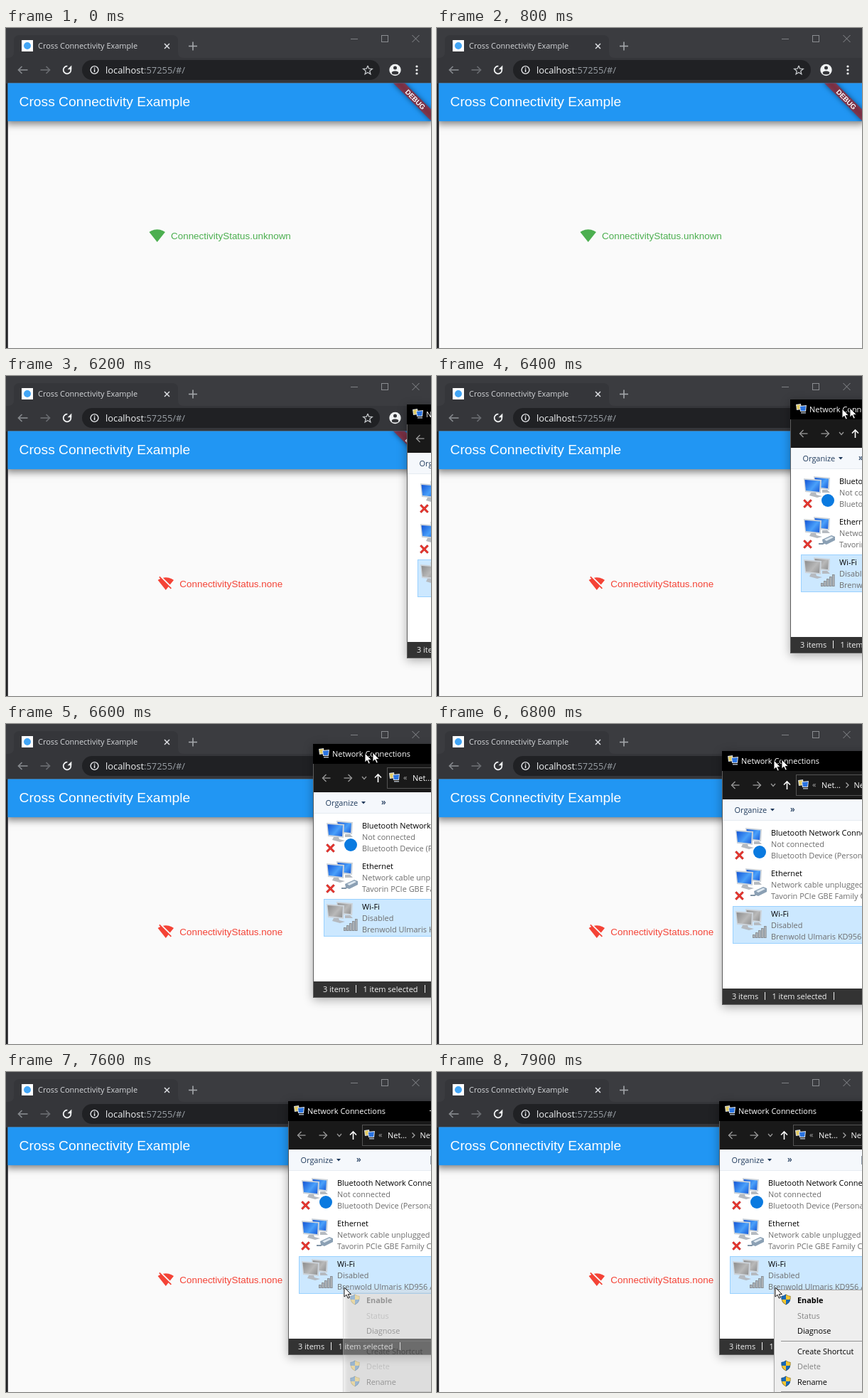
An HTML page with a canvas for the animation above (8000 ms loop, 598 px wide and 450 px high).

```html
<!DOCTYPE html>
<html lang="en">
<head>
<meta charset="utf-8">
<title>Connectivity demo</title>
<style>
html, body { margin: 0; width: 100%; height: 100%; overflow: hidden; background: #fafafa; }
canvas { display: block; width: 598px; height: 450px; }
</style>
</head>
<body>
<canvas id="stage" width="598" height="450"></canvas>
<script>
const c = document.getElementById('stage').getContext('2d');
const LOOP = 8000, STEP = 100, TAU = Math.PI * 2;
const UI = '"Open Sans", "Noto Sans", sans-serif';
const APP = '"Liberation Sans", Arial, sans-serif';

const WIFI_ON = new Path2D('M12.01 21.49L23.64 7c-.45-.34-4.93-4-11.64-4C5.28 3 .81 6.66.36 7l11.63 14.49.01.01z');
const WIFI_OFF = new Path2D('M23.64 7c-.45-.34-4.93-4-11.64-4-1.5 0-2.89.19-4.15.48L18.18 13.8 23.64 7z' +
  'm-6.6 8.22L3.27 1.44 2 2.72l2.05 2.06C1.91 5.76.59 6.82.36 7l11.63 14.49.01.01.01-.01 3.9-4.86 3.32 3.32 1.27-1.27z');
const POINTER = new Path2D('M0 0V14.6L3.4 11.4 5.8 16.8 8.2 15.7 5.8 10.5H10.4Z');

const WINDOW_PATH = [[6200, 565, 40], [6400, 498, 33], [6600, 433, 28], [6700, 415, 31], [6800, 402, 38], [6900, 398, 41]];
const POINTER_PATH = [[6900, 471, 55], [7000, 471, 58], [7100, 470, 190], [7200, 469, 278],
  [7300, 473, 290], [7400, 475, 299], [7500, 476, 303]];

const clamp = v => Math.max(0, Math.min(1, v));

function along(keys, t) {
  let i = 0;
  while (i < keys.length - 2 && t > keys[i + 1][0]) i++;
  const [t0, x0, y0] = keys[i], [t1, x1, y1] = keys[i + 1];
  const k = clamp((t - t0) / (t1 - t0));
  return [x0 + (x1 - x0) * k, y0 + (y1 - y0) * k];
}

function rect(x, y, w, h, fill) {
  c.fillStyle = fill;
  c.fillRect(x, y, w, h);
}

function frame(x, y, w, h, color) {
  c.strokeStyle = color;
  c.lineWidth = 1;
  c.strokeRect(x + .5, y + .5, w - 1, h - 1);
}

function line(points, color, width = 1) {
  c.beginPath();
  points.forEach(([x, y]) => c.lineTo(x, y));
  c.strokeStyle = color;
  c.lineWidth = width;
  c.stroke();
}

function poly(points, fill) {
  c.beginPath();
  points.forEach(([x, y]) => c.lineTo(x, y));
  c.closePath();
  c.fillStyle = fill;
  c.fill();
}

function disc(x, y, r, fill) {
  c.beginPath();
  c.arc(x, y, r, 0, TAU);
  c.fillStyle = fill;
  c.fill();
}

function cross(x, y, r, color, width) {
  line([[x - r, y - r], [x + r, y + r]], color, width);
  line([[x + r, y - r], [x - r, y + r]], color, width);
}

function text(s, x, y, color, size = 10.95, family = UI, weight = 400) {
  c.font = `${weight} ${size}px ${family}`;
  c.fillStyle = color;
  c.fillText(s, x, y);
}

function at(x, y, draw, scale = 1) {
  c.save();
  c.translate(x, y);
  c.scale(scale, scale);
  draw();
  c.restore();
}

// dir 1 points right, -1 points left
function arrow(x, y, r, dir, color, width) {
  line([[x - r * dir, y], [x + r * dir, y]], color, width);
  line([[x + dir * (r - 5), y - 5], [x + r * dir, y], [x + dir * (r - 5), y + 5]], color, width);
}

function browser() {
  rect(0, 0, 598, 78, '#3b3c40');
  rect(0, 42, 598, 36, '#35363a');
  c.beginPath();
  c.moveTo(3, 42);
  c.quadraticCurveTo(11, 42, 11, 34);
  c.lineTo(11, 18);
  c.quadraticCurveTo(11, 10, 19, 10);
  c.lineTo(234, 10);
  c.quadraticCurveTo(242, 10, 242, 18);
  c.lineTo(242, 34);
  c.quadraticCurveTo(242, 42, 250, 42);
  c.fillStyle = '#35363a';
  c.fill();

  rect(22, 17, 16, 16, '#fff');
  disc(30, 25, 5, '#42a5f5');
  text('Cross Connectivity Example', 45, 29, '#d5d7da');
  cross(226.5, 25.5, 3.5, '#dfe1e5', 1.5);
  line([[257, 25.5], [269, 25.5]], '#a4a7ab', 1.6);
  line([[263, 19.5], [263, 31.5]], '#a4a7ab', 1.6);

  line([[485, 15.5], [495, 15.5]], '#7e8084');
  frame(528, 10, 10, 10, '#8a8c90');
  cross(576.5, 15, 5, '#8a8c90', 1);

  arrow(24, 59, 6.5, -1, '#85888c', 1.7);
  arrow(55, 59, 6.5, 1, '#696c70', 1.7);
  c.beginPath();
  c.arc(86, 59, 5.3, -.7, TAU - 1.5, false);
  c.strokeStyle = '#f1f3f4';
  c.lineWidth = 1.8;
  c.stroke();
  poly([[92.3, 52.5], [92.3, 58.2], [86.6, 58.2]], '#f1f3f4');

  c.beginPath();
  c.roundRect(107, 45, 419, 28, 14);
  c.fillStyle = '#202124';
  c.fill();
  c.beginPath();
  c.arc(124.5, 59, 5.4, 0, TAU);
  c.strokeStyle = '#e8eaed';
  c.lineWidth = 1.4;
  c.stroke();
  rect(123.8, 58, 1.5, 4, '#e8eaed');
  rect(123.8, 55.7, 1.5, 1.5, '#e8eaed');
  text('localhost', 140, 63.7, '#f1f3f4', 12.9);
  text(':57255/#/', 140 + c.measureText('localhost').width, 63.7, '#9aa0a6', 12.9);

  const star = Array.from({ length: 11 }, (_, i) => {
    const r = i % 2 ? 2.9 : 6.6, a = i * Math.PI / 5 - Math.PI / 2;
    return [509 + r * Math.cos(a), 59.5 + r * Math.sin(a)];
  });
  line(star, '#c4c7ca', 1.3);

  disc(547.5, 59, 8.2, '#f1f3f4');
  disc(547.5, 56, 2.5, '#35363a');
  c.beginPath();
  c.ellipse(547.5, 63, 4.8, 2.5, 0, 0, TAU);
  c.fill();
  for (const y of [54, 59, 64]) disc(578, y, 1.6, '#f1f3f4');
}

function banner() {
  c.save();
  c.translate(599, 77.3);
  c.rotate(Math.PI / 4);
  c.scale(.96, .96);
  c.filter = 'blur(3.6px)';
  rect(-40, 28, 80, 12, 'rgba(0,0,0,.5)');
  c.filter = 'none';
  rect(-40, 28, 80, 12, 'rgba(183,28,28,.627)');
  c.textAlign = 'center';
  text('DEBUG', 0, 37.7, '#fff', 10.2, APP, 700);
  c.restore();
}

function page(online) {
  const left = 2.5, top = 77.4;
  rect(0, 78, 3, 372, '#202124');
  c.save();
  c.beginPath();
  c.rect(left, top, 598, 373);
  c.clip();
  rect(left, top, 598, 373, '#fafafa');
  c.shadowColor = 'rgba(0,0,0,.5)';
  c.shadowBlur = 10;
  c.shadowOffsetY = 4;
  rect(0, 70, 600, 61.1, '#2196f3');
  c.shadowColor = 'transparent';
  text('Cross Connectivity Example', 18.5, 110.4, '#fff', 19.25, APP);
  banner();
  c.restore();

  const color = online ? '#4caf50' : '#f44336';
  c.fillStyle = color;
  at(online ? 201.2 : 213.3, 280.3, () => c.fill(online ? WIFI_ON : WIFI_OFF), .96);
  text('ConnectivityStatus.' + (online ? 'unknown' : 'none'), online ? 232 : 244.3, 296.6, color, 13.44, APP);
}

function monitor(x, y, w, h, [light, dark]) {
  poly([[x, y], [x + w, y + 2], [x + w - 1, y + h], [x + 2, y + h - 2]], '#ccd3da');
  const g = c.createLinearGradient(x, y, x + w, y + h);
  g.addColorStop(0, dark);
  g.addColorStop(.55, light);
  g.addColorStop(1, dark);
  poly([[x + 1.5, y + 2], [x + w - 2, y + 3.5], [x + w - 3, y + h - 2], [x + 3, y + h - 4]], g);
}

function computers(x, y, off) {
  const tone = off ? ['#b9b9b9', '#848484'] : ['#4aa0fa', '#0a48cf'];
  monitor(x + 15, y, 23, 19, tone);
  poly([[x + 27, y + 19], [x + 34, y + 19], [x + 38, y + 23], [x + 27, y + 23]], '#b5bac0');
  monitor(x + 1, y + 3, 25, 21, tone);
  poly([[x + 11, y + 23], [x + 18, y + 23], [x + 19, y + 26], [x + 27, y + 28], [x + 20, y + 30], [x + 9, y + 27]], '#b5bac0');
}

function smallComputers(x, y) {
  poly([[x, y + 1], [x + 7, y], [x + 8, y + 8], [x + 1, y + 9]], '#d9dde2');
  poly([[x + 1, y + 2], [x + 6, y + 1.2], [x + 7, y + 7], [x + 2, y + 8]], '#e3cc62');
  poly([[x + 5, y + 3], [x + 15, y + 2], [x + 14, y + 11], [x + 6, y + 11]], '#d9dde2');
  poly([[x + 6, y + 4], [x + 14, y + 3.2], [x + 13, y + 10], [x + 7, y + 10]], '#2a74e2');
  rect(x + 7, y + 12, 7, 1.5, '#aeb5bd');
}

function badCross(x, y) {
  cross(x, y, 5.2, '#b52020', 3);
  cross(x, y, 5, '#e8372f', 2);
}

function plug(x, y) {
  line([[x - 1, y + 14], [x + 5, y + 14], [x + 10, y + 9]], '#8194a6', 2);
  poly([[x + 4, y + 8], [x + 17, y + 2], [x + 22, y + 4], [x + 22, y + 9], [x + 10, y + 15], [x + 5, y + 13]], '#8ba0b4');
  poly([[x + 7, y + 8], [x + 17, y + 3.5], [x + 20, y + 5], [x + 10, y + 10]], '#dfe9f1');
}

function bars(x, y) {
  for (let i = 0; i < 5; i++) {
    const h = 5 + i * 3;
    rect(x + i * 4, y + 17 - h, 3.6, h, '#8a8f94');
    rect(x + i * 4 + 1, y + 18 - h, 1.4, h - 2, '#b9bdc1');
  }
}

const ROWS = [
  ['Bluetooth Network Connection', 'Not connected', 'Bluetooth Device (Personal Area)'],
  ['Ethernet', 'Network cable unplugged', 'Tavorin PCIe GBE Family Controller'],
  ['Wi-Fi', 'Disabled', 'Brenwold Ulmaris KD956 Adapter']
];

function row(i, hover) {
  const y = 104 + i * 57;
  if (i === 1) {
    c.globalAlpha = hover;
    rect(14, y, 260, 53, '#e5f3ff');
    c.globalAlpha = 1;
  }
  if (i === 2) {
    rect(14, y, 260, 53, '#cce8ff');
    frame(14, y, 260, 53, '#99d1ff');
  }
  computers(17, y + 4, i === 2);
  if (i < 2) badCross(23.5, y + 42.5);
  if (i === 0) disc(52, y + 38, 9, '#0a7ae0');
  if (i === 1) plug(40, y + 28);
  if (i === 2) bars(42, y + 28);
  ROWS[i].forEach((s, n) => text(s, 68, y + 14.5 + n * 16.3, n ? '#6d6d6d' : '#000'));
}

function connections(hover) {
  const w = 290, h = 357;
  c.save();
  c.shadowColor = 'rgba(0,0,0,.32)';
  c.shadowBlur = 13;
  c.shadowOffsetY = 3;
  rect(-1, 0, w, h, '#fff');
  c.restore();

  rect(-1, 0, w, 28, '#000');
  smallComputers(7, 6);
  text('Network Connections', 26, 18, '#fff');
  line([[198, 13.5], [208, 13.5]], '#fff');

  rect(-1, 28, w, 40, '#191919');
  arrow(18, 48, 5.5, -1, '#9a9a9a', 1.3);
  arrow(48, 48, 5.5, 1, '#9a9a9a', 1.3);
  line([[68, 46], [71, 49.5], [74, 46]], '#9a9a9a', 1.2);
  line([[90.5, 54], [90.5, 43]], '#fff', 1.6);
  line([[86, 47.5], [90.5, 43], [95, 47.5]], '#fff', 1.6);
  frame(103, 33, w, 30, '#535353');
  smallComputers(106, 40);
  text('«', 126, 51, '#ababab');
  text('Net...', 139, 52, '#fff');
  line([[173.5, 44.5], [177, 48], [173.5, 51.5]], '#ababab', 1.2);
  text('Network Connections', 184.5, 52, '#fff');

  rect(0, 68, w, 29, '#f5f8fc');
  rect(0, 97, w, 1, '#e6ebf1');
  text('Organize', 16.5, 87, '#1e395b');
  poly([[67, 81], [73, 81], [70, 84.5]], '#1e395b');
  text('»', 95, 86, '#1e395b', 12, UI, 600);
  frame(199, 77, 14, 12, '#8a96a3');

  for (let i = 0; i < 3; i++) row(i, hover);

  rect(-1, 334, w, 23, '#333');
  text('3 items', 13, 349, '#f2f2f2');
  text('1 item selected', 69.5, 349, '#f2f2f2');
  rect(59, 339, 1, 11, '#eee');
  rect(156, 339, 1, 11, '#eee');
  line([[-.5, 28], [-.5, h - .5], [w, h - .5]], '#5c5c5c');
}

function shield(x, y) {
  c.save();
  c.beginPath();
  c.moveTo(x, y - 7.5);
  c.quadraticCurveTo(x + 3, y - 5, x + 6.5, y - 5);
  c.quadraticCurveTo(x + 7.5, y + 4, x, y + 7.5);
  c.quadraticCurveTo(x - 7.5, y + 4, x - 6.5, y - 5);
  c.quadraticCurveTo(x - 3, y - 5, x, y - 7.5);
  c.clip();
  rect(x - 8, y - 8, 8, 8, '#1769b8');
  rect(x, y - 8, 8, 8, '#f8c62e');
  rect(x - 8, y, 8, 8, '#f8c62e');
  rect(x, y, 8, 8, '#1769b8');
  c.strokeStyle = 'rgba(40,60,80,.6)';
  c.lineWidth = 1.5;
  c.stroke();
  c.restore();
}

function item(label, y, secure, grey, weight) {
  if (secure) shield(491, y - 1);
  text(label, 507, y + 4, grey ? '#838383' : '#000', 10.9, UI, weight);
}

function menu(alpha) {
  c.save();
  c.globalAlpha = alpha;
  c.shadowColor = 'rgba(0,0,0,.45)';
  c.shadowBlur = 5;
  c.shadowOffsetX = c.shadowOffsetY = 3;
  rect(474, 306, 180, 200, '#eee');
  c.shadowColor = 'transparent';
  frame(474, 306, 180, 200, '#a9a9a9');
  item('Enable', 321, true, false, 700);
  item('Status', 343, false, true);
  item('Diagnose', 364, false, false);
  rect(484, 378, 120, 1, '#919191');
  item('Create Shortcut', 393, false, false);
  item('Delete', 414, true, true);
  item('Rename', 436, true, false);
  rect(484, 449, 120, 1, '#919191');
  c.restore();
}

function pointer(x, y) {
  at(x, y, () => {
    c.fillStyle = '#fff';
    c.strokeStyle = '#000';
    c.lineWidth = 1;
    c.fill(POINTER);
    c.stroke(POINTER);
  }, .9);
}

function draw(t) {
  c.clearRect(0, 0, 598, 450);
  browser();
  page(t < 3400);
  if (t < 6200) return;

  const [x, y] = along(WINDOW_PATH, t);
  const hover = t < 7100 ? 0 : clamp((7500 - t) / 300);
  at(Math.round(x), Math.round(y), () => connections(hover));
  if (t >= 7600) menu(clamp((t - 7500) / 300));
  if (t < 6900) {
    pointer(x + 83, y + 12);
    pointer(x + 72, y + 13);
  } else {
    pointer(...along(POINTER_PATH, t));
  }
}

const start = performance.now();
function tick() {
  const t = (performance.now() - start) % LOOP;
  draw(Math.floor(t / STEP) * STEP);
  requestAnimationFrame(tick);
}
tick();
</script>
</body>
</html>
```
